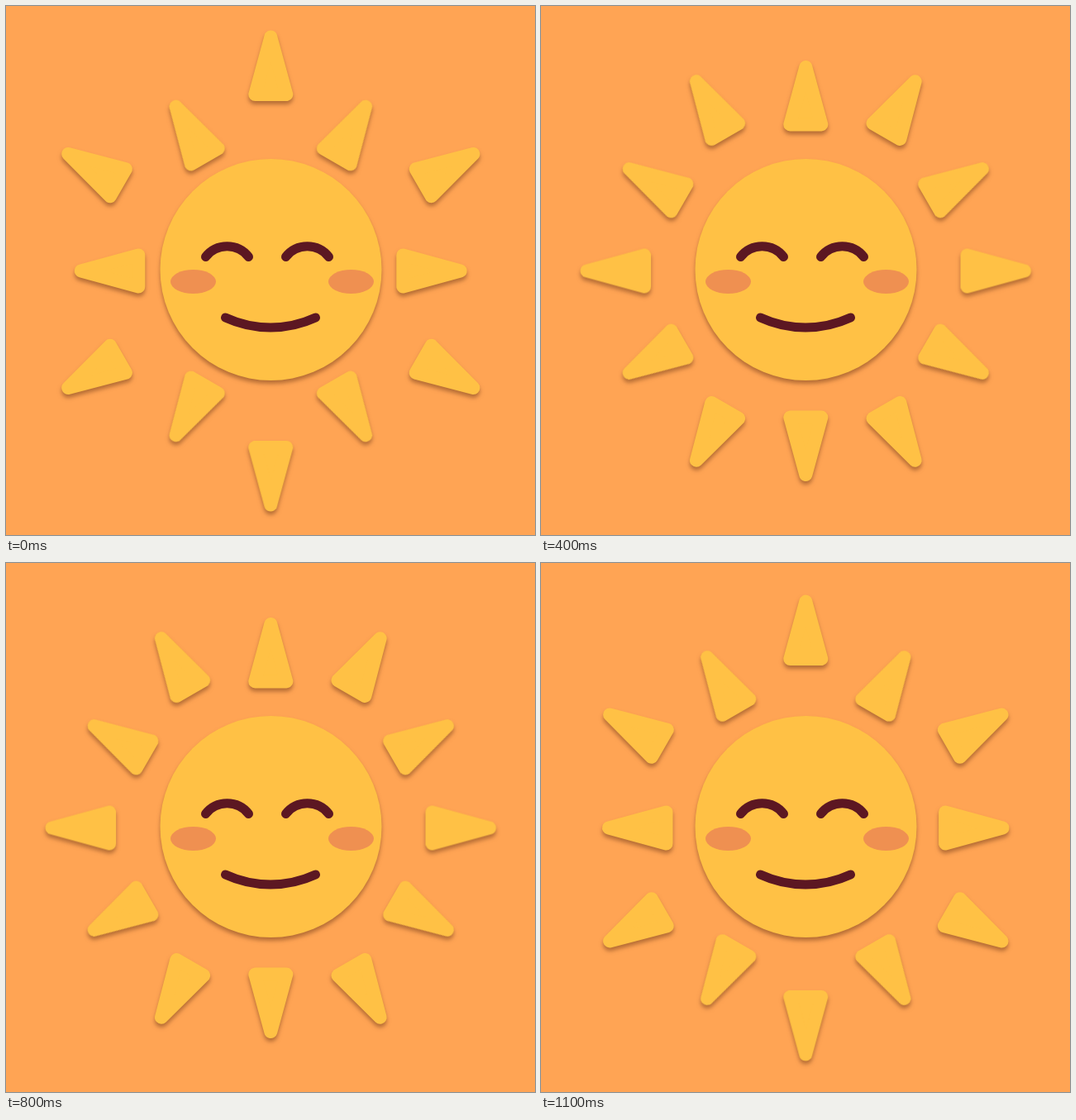
These frames come from a looping animation (640 by 640 pixels, 1.2 s). An HTML page:

```html
<!DOCTYPE html>
<html lang="en">
<head>
<meta charset="utf-8">
<title>Smiling sun</title>
<style>
  html, body { margin: 0; width: 100%; height: 100%; overflow: hidden; background: #ffa454; }
  svg { display: block; width: 100%; height: 100%; }
  .sun { fill: #ffc145; stroke-linejoin: round; filter: drop-shadow(0 4px 2.5px rgba(115, 60, 25, .52)); }
  #rays { stroke: #ffc145; stroke-width: 16; }
  .cheeks { fill: #ef9051; }
  .lines { fill: none; stroke: #5c1722; stroke-width: 11; stroke-linecap: round; }
</style>
</head>
<body>
<svg viewBox="0 0 640 640">
  <g class="sun">
    <g id="rays"></g>
    <circle cx="320.5" cy="319" r="134"/>
  </g>
  <g class="cheeks">
    <ellipse cx="226.5" cy="333.5" rx="27.5" ry="14.5"/>
    <ellipse cx="417.5" cy="333.5" rx="27.5" ry="14.5"/>
  </g>
  <path class="lines" d="M241.5 303.5a33 33 0 0 1 52 0m45 0a33 33 0 0 1 52 0M265.5 377a130 130 0 0 0 109 0"/>
</svg>
<script>
  const LOOP = 1200, TICK = 100;

  const rays = Array.from({ length: 12 }, () => {
    const ray = document.createElementNS("http://www.w3.org/2000/svg", "path");
    ray.setAttribute("d", "M0-69.5L19 0H-19Z");
    return document.getElementById("rays").appendChild(ray);
  });

  function draw() {
    const tick = Math.floor(performance.now() % LOOP / TICK);
    const k = 6 - Math.abs(6 - tick);
    // Neighbouring rays slide in opposite directions
    rays.forEach((ray, i) => {
      const radius = i % 2 ? 160 + 8.8 * k : 213.5 - 9.1 * k;
      ray.setAttribute("transform", `translate(320.3 320.5) rotate(${i * 30}) translate(0 ${-radius})`);
    });
    requestAnimationFrame(draw);
  }
  draw();
</script>
</body>
</html>
```
